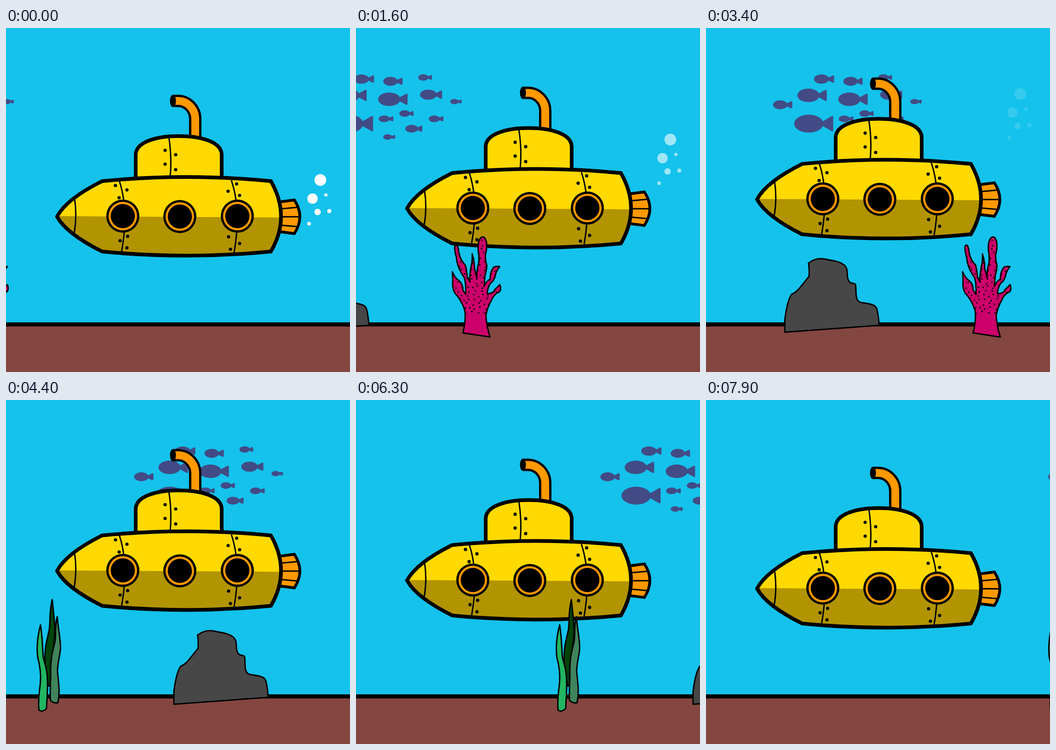
Write an HTML page that moves like this. It is 748 px wide and 748 px high and loops after 8 s.

```html
<!DOCTYPE html>
<html lang="en">
<head>
<meta charset="utf-8">
<title>Submarine</title>
<style>
html, body { margin: 0; width: 100%; height: 100%; overflow: hidden; background: #14c2ec; }
svg { display: block; width: 100%; height: 100%; }
.line { fill: none; stroke: #000; stroke-width: 3; }
.hull { stroke: #000; stroke-width: 8; }
.thing { stroke: #000; stroke-width: 3; stroke-linejoin: round; }
</style>
</head>
<body>
<svg viewBox="0 0 748 748">
  <defs>
    <path id="body" d="M111 410Q131 372 209 333Q392 315 576 333Q620 410 576 486Q392 504 209 486Q131 447 111 410Z"/>
    <path id="coral" d="M581 663Q588 635 585 614Q578 592 564 577Q557 567 559 548L558 530Q564 544 572 549Q581 556 581 570L587 579Q588 556 584 543Q568 520 567 500Q561 478 564 473Q570 468 572 487Q575 505 586 515Q590 530 590 540L595 551Q596 535 598 522Q602 508 601 491Q606 505 606 522L611 543Q611 525 615 512Q617 500 614 483Q613 462 620 456Q628 450 632 465Q634 480 630 492Q629 503 633 517Q632 528 629 538L627 562Q632 550 640 546Q640 530 648 520Q655 517 661 519Q653 528 651 540Q648 550 641 555Q634 565 634 578Q648 577 651 568Q657 563 661 558Q665 566 661 573Q647 580 643 592Q634 608 631 625Q632 648 640 672Z"/>
    <clipPath id="inBody"><use href="#body"/></clipPath>
    <clipPath id="inCoral"><use href="#coral"/></clipPath>
  </defs>

  <rect width="748" height="748" fill="#14c2ec"/>
  <g id="fish" fill="#424b85" stroke="#424b85" stroke-linejoin="round"></g>
  <g id="bubbles" fill="#fff"></g>

  <g id="sub">
    <path id="pipe" d="M363 158.5H374A37.5 39.5 0 0 1 411.5 198V240" fill="none" stroke="#000" stroke-width="27"/>
    <use href="#pipe" style="stroke:#f90"/>
    <path d="M363 158.5H374A37.5 39.5 0 0 1 411.5 198V240" fill="none" stroke="#f90" stroke-width="17"/>
    <ellipse cx="363" cy="158.5" rx="6.5" ry="13.3"/>
    <path class="hull" fill="#ffd900" d="M282 326V276C282 246 332 235 375 235C420 235 469 246 469 276V326"/>
    <path class="line" d="M354 237Q361 280 357 324"/>
    <path d="M596 378L627 374Q651 410 627 447L596 443Z" fill="#f90" stroke="#000" stroke-width="6"/>
    <path class="line" d="M600 393L633 390M600 410.5H638M600 429L634 432"/>
    <use href="#body" fill="#ffd900"/>
    <path clip-path="url(#inBody)" fill="#b29400" d="M100 409L610 412V510H100Z"/>
    <path class="line" d="M149 370Q155 409 148 448M246 331Q268 396 251 488M490 331Q512 396 496 488"/>
    <use href="#body" class="hull" fill="none"/>
    <g id="details"></g>
  </g>

  <path d="M0 644H748V748H0Z" fill="#844640"/>
  <path d="M0 640H748V649H0Z"/>

  <g id="ground">
    <use href="#coral" class="thing" fill="#cc006b"/>
    <g id="dots" clip-path="url(#inCoral)"></g>
    <path class="thing" fill="#474747" d="M171.500 661.500V634Q176 595 186 579Q196 576 208 560L224 540Q225 525 223 511C238 500 250 500 266 504C292 508 307 514 307 530C307 548 311 554 318 555C326 555 326 559 326 568C326 588 328 595 338 597C360 600 370 602 372 613Q375 625 376.500 646.500Z"/>
    <g class="thing" transform="translate(-193.600)">
      <path fill="#00440a" d="M100.500 434C93 465 97 480 94 500C88 525 83 545 85 570C87 595 90 605 92 622L96 622C96 600 97 580 101 555C104 530 108 510 106 490C104 465 103 460 100.500 434Z"/>
      <path fill="#40845c" d="M111.500 471C105 495 110 505 106 528C100 550 97 565 97 590C98 610 95 630 96.500 653Q105 661 113 658C118 630 114 615 112 590C112 570 118 555 118.500 540C119 520 114 505 111.500 471Z"/>
      <path fill="#22b561" d="M75 489C67 520 67 545 69 560C77 590 76 610 73 630C71 645 70 655 71.500 674Q78 680 88 671C89 650 91 630 90 610C90 590 85 575 81 560C79 540 80 520 75 489Z"/>
    </g>
  </g>
</svg>
<script>
const $ = id => document.getElementById(id);
const circle = (x, y, r, fill) =>
  `<circle cx="${x}" cy="${y}" r="${r}"${fill ? ` fill="${fill}"` : ''}/>`;

$('pipe').nextElementSibling.remove();

// Fish: left edge, middle height, length
$('fish').innerHTML = [
  [474, 111, 44], [538, 116, 42], [614, 107.5, 30], [438, 146.5, 64], [527, 155, 64],
  [618, 145, 48], [683.5, 160, 25], [385, 167, 42], [431, 208, 85], [528, 197.5, 32],
  [573, 186, 31], [637, 197.5, 32], [586, 219, 37], [538, 237, 26]
].map(([x, y, len]) => {
  const h = .21 * len - 3.2;
  return `<ellipse cx="${x + .375 * len}" cy="${y}" rx="${.375 * len}" ry="${.23 * len}" stroke="none"/>
    <path d="M${x + .67 * len} ${y}L${x + len - 2} ${y - h}v${2 * h}Z" stroke-width="4"/>`;
}).join('');

$('bubbles').innerHTML = [
  [683.5, 330.5, 12.8], [666.5, 371, 11.3], [695.5, 363, 3.6],
  [677.5, 400, 7], [703, 398, 4.6], [659, 425.5, 4]
].map(b => circle(...b)).join('');

const rivets = [
  [346, 266], [369, 275.5], [346, 296], [369, 308],
  [238, 342.5], [263, 352], [246, 369], [248, 462.5], [264.5, 453], [263, 478],
  [501.5, 339], [483, 355], [508, 364], [484, 454], [508, 468.5], [488, 481]
];
const windows = [[254, 409], [378, 410], [503, 409]];
$('details').innerHTML =
  rivets.map(([x, y]) => circle(x, y, 3.6)).join('') +
  windows.map(([x, y]) => circle(x, y, 36) + circle(x, y, 31, '#f90') + circle(x, y, 26.3)).join('');

let dots = '';
for (let row = 0; row < 18; row++)
  for (let col = 0; col < 9; col++) {
    const n = row * 9 + col;
    dots += circle(560 + col * 12 + row % 2 * 6 + 2.5 * Math.sin(n * 5.3),
      462 + row * 9.2 + 2.5 * Math.sin(n * 3.7), 1.7);
  }
$('dots').innerHTML = dots;

const LOOP = 8000, STEP = 100, LAST = LOOP - STEP;
const move = (id, x, y) => $(id).setAttribute('transform', `translate(${x} ${y})`);

function draw(now) {
  const t = Math.floor(now % LOOP / STEP) * STEP;
  move('fish', .133 * (t - 5200), 0);
  move('ground', .1936 * (t - 3400), 0);
  move('sub', 0, -.011 * Math.min(t, LAST - t));
  move('bubbles', 0, -.055 * t);
  $('bubbles').setAttribute('opacity', Math.max(0, 1 - t / (LAST / 2)));
}

const start = performance.now();
function tick() {
  draw(performance.now() - start);
  requestAnimationFrame(tick);
}
tick();
</script>
</body>
</html>
```
